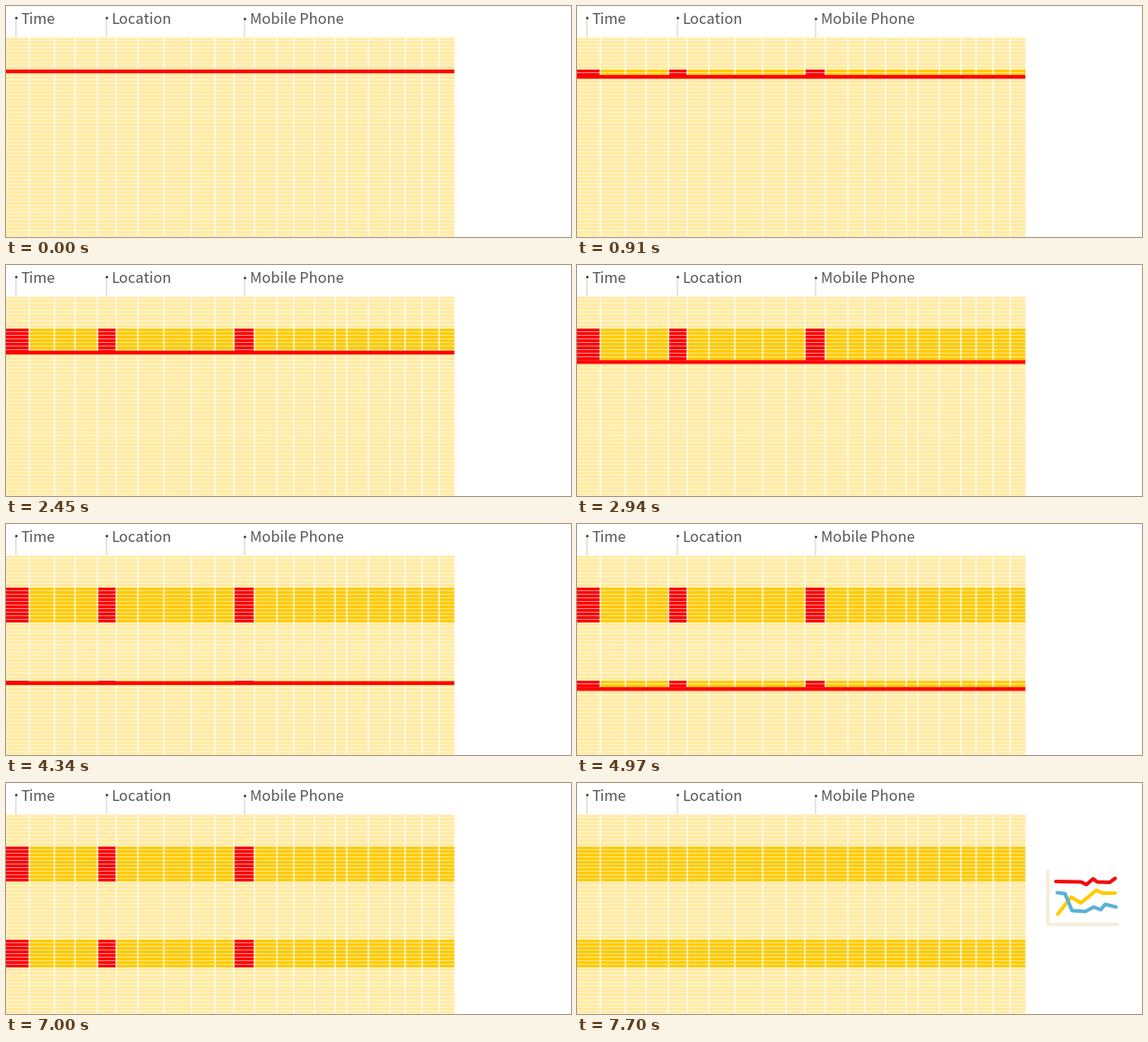
These frames come from a looping animation (630 by 258 pixels, 8050 ms). A matplotlib script:

```python
import numpy as np
import matplotlib.pyplot as plt
from matplotlib.animation import FuncAnimation
from matplotlib.patches import Rectangle

W, H, DPI = 630, 258, 100
STEP, FRAMES = 70, 115
PX = 72 / DPI

TABLE_W, TOP, BOTTOM, PITCH = 500, 35.5, 257.5, 4
GAPS = [26, 54, 77, 102, 123, 147, 176, 207, 233, 254, 277,
        302, 321, 344, 367, 380, 404, 428, 445, 464, 483]
KEY_CELLS = [(0, 25.5), (102.5, 122.5), (254.5, 276.5)]

PALE, GOLD, RED, BLUE = "#ffeba2", "#ffcb05", "#fc0004", "#5ab1d8"
CREAM = "#f6eedc"

# Scan line: (time, height) keys for each pass, then the block it reveals.
PASSES = [
    dict(start=0, end=4130, top=71, bottom=110,
         t=[210, 1120, 1820, 1960, 2800, 2940],
         y=[73, 81, 89.3, 93, 101.3, 108.4]),
    dict(start=4130, end=7000, top=175, bottom=206,
         t=[4270, 4970, 5110, 5530, 6090, 6440, 6580, 6930],
         y=[177, 184.3, 185.7, 193, 196.2, 200.5, 205, 209]),
]
FADE_START, FADE_STEPS = 7490, 4

fig = plt.figure(figsize=(W / DPI, H / DPI), dpi=DPI, facecolor="white")
ax = fig.add_axes([0, 0, 1, 1])
ax.set_xlim(0, W)
ax.set_ylim(H, 0)
ax.axis("off")


def box(x0, y0, x1, y1, color, z, alpha=1):
    patch = Rectangle((x0, y0), x1 - x0, y1 - y0, facecolor=color,
                      linewidth=0, zorder=z, alpha=alpha, snap=False)
    return ax.add_patch(patch)


def stroke(points, color, width, z=6, cap="round"):
    x, y = zip(*points)
    line, = ax.plot(x, y, color=color, lw=width * PX, zorder=z, snap=False,
                    solid_capstyle=cap, solid_joinstyle="round")
    return line


def label(text, pin_x, pin_y, text_x):
    stroke([(pin_x, pin_y), (pin_x, 35)], "#cccccc", 1, 1, "butt")
    ax.plot(pin_x, pin_y, marker="D", ms=2.4 * PX, mew=0, color="#333333",
            zorder=2)
    ax.text(text_x, 20, text, family="Noto Sans CJK JP", size=16.4 * PX,
            color="#555555", va="baseline", ha="left")


label("Time", 11, 12.5, 16.5)
label("Location", 112, 12.5, 117.5)
label("Mobile Phone", 266, 13.5, 271.5)

# Table: pale ground with translucent row and column gaps on top.
box(0, TOP, TABLE_W, BOTTOM, PALE, 1)
for y in np.arange(38, BOTTOM, PITCH):
    box(0, y, TABLE_W, y + 1, "white", 4, 0.55)
for x in GAPS:
    box(x - 0.9, TOP, x + 0.9, BOTTOM, "white", 4, 0.7)

for p in PASSES:
    p["gold"] = box(0, p["top"], TABLE_W, p["top"], GOLD, 2)
    p["keys"] = [box(a, p["top"], b, p["top"], RED, 3) for a, b in KEY_CELLS]
scan = box(0, 71, TABLE_W, 75, "#ff0000", 5)

chart = [
    stroke([(525, 98), (525, 158), (603, 158)], CREAM, 4),
    stroke([(534, 110), (562, 110.5), (568, 113.5), (575.5, 107),
            (580, 110.5), (594, 111), (600, 106.5)], "#f50a0a", 4),
    stroke([(536, 146.5), (551, 127.5), (562, 134), (579, 119.8),
            (586, 123), (600, 123)], GOLD, 4),
    stroke([(535.5, 122.5), (544, 123.5), (552, 142.5), (567, 143.5),
            (576, 138.5), (584, 141.5), (589, 135.5), (601, 138.5)], BLUE, 4),
]


def update(i):
    now = i * STEP
    fade = np.clip(((now - FADE_START) / STEP + 1) / FADE_STEPS, 0, 1)
    scan.set_visible(False)
    for p in PASSES:
        y = np.interp(now, p["t"], p["y"])
        shown = now >= p["start"]
        if shown and now < p["end"]:
            scan.set_visible(True)
            scan.set_y(y - 2.1)
            scan.set_height(4.2)
        edge = p["bottom"] if now >= p["end"] else min(y + 1, p["bottom"])
        for patch in [p["gold"], *p["keys"]]:
            patch.set_visible(shown)
            patch.set_height(edge - p["top"])
        for patch in p["keys"]:
            patch.set_alpha(1 - fade)
    for line in chart:
        line.set_alpha(fade)
    return []


anim = FuncAnimation(fig, update, frames=FRAMES, interval=STEP,
                     repeat=True, repeat_delay=0, blit=False)
plt.show()
```
